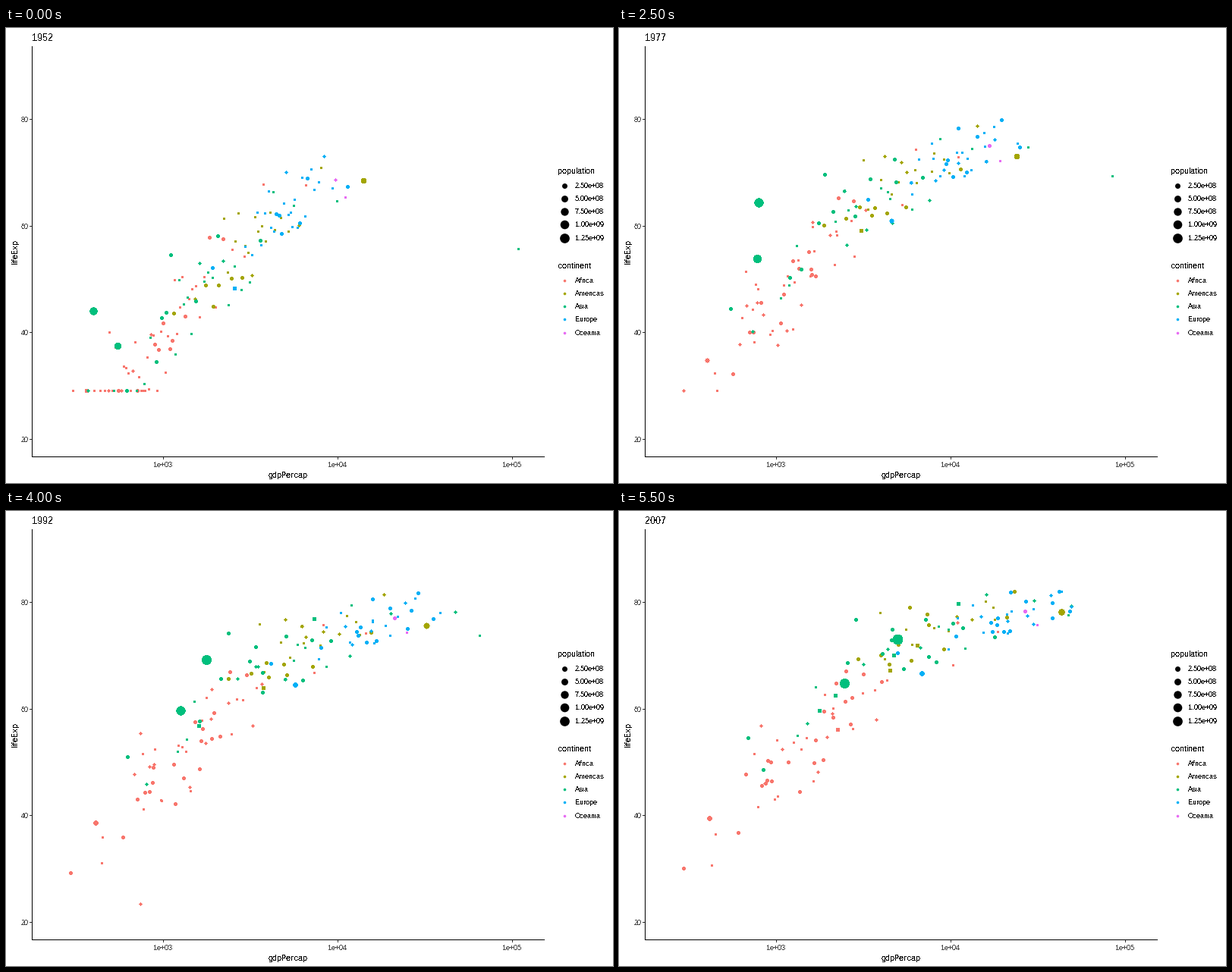
Animation, 800 px wide and 600 px high, one loop 6 s. Source, as a matplotlib script:

```python
import numpy as np
import matplotlib.pyplot as plt
from matplotlib.animation import FuncAnimation

plt.rcParams.update({
    "font.family": "Liberation Sans",
    "text.hinting": "native",
    "text.hinting_factor": 1,
    "text.antialiased": False,
})

PX = 0.72  # points per pixel at 100 dpi
YEARS = range(1952, 2008, 5)
COLORS = {"Africa": "#F8766D", "Americas": "#A3A500", "Asia": "#00BF7D",
          "Europe": "#00B0F6", "Oceania": "#E76BF3"}

# Count, first and last mean of log GDP, spread, late lift in life expectancy
CONTINENTS = {
    "Africa": (51, 2.99, 3.22, 0.29, -3),
    "Americas": (24, 3.48, 3.90, 0.22, 4),
    "Asia": (30, 3.20, 3.75, 0.35, 3),
    "Europe": (30, 3.70, 4.33, 0.19, 1),
    "Oceania": (2, 4.01, 4.46, 0.05, 1),
}

# Each track is (first, last, pace)
LANDMARKS = [
    dict(continent="Africa", pop=(2.5, 9), gdp=(493, 863, 1), life=(40, 46, 1), dip=(1992, 21)),
    dict(continent="Americas", pop=(158, 301), gdp=(13990, 42952, 0.93), life=(68.4, 78.2, 0.95)),
    dict(continent="Asia", pop=(0.2, 2.5), gdp=(108382, 47307, 1.5), life=(55.6, 77.6, 0.6)),
    dict(continent="Asia", pop=(372, 1110), gdp=(547, 2452, 1.85), life=(37.4, 64.7, 0.65)),
    dict(continent="Asia", pop=(556, 1319), gdp=(400, 4959, 1.65), life=(44, 73, 0.45), dip=(1962, 13)),
]


def progress(year):
    return (year - 1952) / 55


def track(t, first, last, pace=1):
    return first + (last - first) * t ** pace


def make_continent(rng, count, start):
    """Evenly ranked wealth scores, skewed to the right for poor continents."""
    u = (np.arange(count) + 0.5) / count
    wealth = np.log(u / (1 - u)) / 2
    wealth += 0.25 * (3.5 - start) * (wealth ** 2 - 1)
    health = np.clip(rng.normal(size=count), -2, 2)
    drift = rng.uniform(-0.5, 0.5, count)
    pop = np.clip(5 * np.exp(1.1 * rng.normal(size=count)), 0.3, 70)
    return wealth, health, drift, pop


def continent_state(year, spec, traits):
    _, start, end, spread, lift = spec
    wealth, health, drift, pop = traits
    t = progress(year)
    log_gdp = track(t, start, end, 0.8) + spread * (1 + 0.3 * t) * (wealth + t * drift)
    log_gdp = np.clip(log_gdp, 2.47, 4.69)
    # Life expectancy saturates with wealth, and the gap closes over time
    gap = 30 + 13 * (1 - t) ** 2
    life = 84 - gap * np.exp(3 - log_gdp) + lift * t
    life += 6 * health * np.exp(0.7 * (3 - log_gdp))
    return log_gdp, np.clip(life, 29, 82), pop * (1 + 1.1 * t)


def landmark_state(year, country):
    t = progress(year)
    first, last, pace = country["gdp"]
    log_gdp = track(t, np.log10(first), np.log10(last), pace)
    dip_year, depth = country.get("dip", (year, 0))
    life = track(t, *country["life"]) - depth * max(0, 1 - abs(year - dip_year) / 6)
    return [log_gdp], [life], [track(t, *country["pop"])]


def to_x(log_gdp):
    return np.floor(207.5 + 230 * (log_gdp - 3)) + 0.5


def to_y(life):
    return np.floor(120.5 + 7.025 * (80 - life)) + 0.5


def area(pop):
    diameter = 2.3 + 10.7 * np.sqrt(np.asarray(pop) / 1319)
    return (diameter * PX) ** 2


rng = np.random.default_rng(7)
traits = {name: make_continent(rng, *spec[:2]) for name, spec in CONTINENTS.items()}
dot_colors = [COLORS[name] for name, spec in CONTINENTS.items() for _ in range(spec[0])]
dot_colors += [COLORS[country["continent"]] for country in LANDMARKS]


def world(year):
    parts = [continent_state(year, CONTINENTS[name], traits[name]) for name in CONTINENTS]
    parts += [landmark_state(year, country) for country in LANDMARKS]
    return np.hstack([np.array(part) for part in parts])


fig = plt.figure(figsize=(8, 6), dpi=100, facecolor="white")
ax = fig.add_axes([0, 0, 1, 1])
ax.set(xlim=(0, 800), ylim=(600, 0))
ax.axis("off")


def line(xs, ys, color="black"):
    ax.plot(xs, ys, color=color, lw=PX, antialiased=False, snap=False,
            solid_capstyle="butt")


def label(x, y, text, size, color="black", **kwargs):
    return ax.text(x, y, text, fontsize=size * PX, color=color, va="baseline", **kwargs)


def dots(x, y, sizes, colors):
    return ax.scatter(x, y, s=sizes, c=colors, linewidths=0, antialiased=False)


# Axes
line([34.5, 34.5], [24, 566])
line([34, 710], [565.5, 565.5])
for value in range(20, 81, 20):
    y = to_y(value)
    line([31, 34], [y, y], "#333333")
    label(29.5, y + 3.5, str(value), 9, "#4D4D4D", ha="right")
for power in (3, 4, 5):
    x = to_x(power)
    line([x, x], [566, 569], "#333333")
    label(x - 1, 579, f"1e+0{power}", 9, "#4D4D4D", ha="center")
label(372, 593, "gdpPercap", 11, ha="center")
label(15, 295, "lifeExp", 11, ha="center", rotation=90, rotation_mode="anchor")
title = label(34, 17, "", 13)

# Legends
label(727, 192, "population", 11)
for row in range(5):
    pop = 250 * (row + 1)
    y = np.floor(207 + 17.25 * row) + 0.5
    dots([735.5], [y], area([pop]), "black")
    label(750, y + 3.5, f"{pop * 1e6:.2e}", 9)
label(727, 317, "continent", 11)
for row, (name, color) in enumerate(COLORS.items()):
    y = np.floor(332 + 17.25 * row) + 0.5
    dots([735.5], [y], [(3.6 * PX) ** 2], color)
    label(750, y + 3.5, name, 9)

blank = np.zeros(len(dot_colors))
cloud = dots(blank, blank, blank + 1, dot_colors)


def update(frame):
    year = YEARS[frame]
    log_gdp, life, pop = world(year)
    cloud.set_offsets(np.column_stack([to_x(log_gdp), to_y(life)]))
    cloud.set_sizes(area(pop))
    title.set_text(str(year))
    return cloud, title


anim = FuncAnimation(fig, update, frames=len(YEARS), interval=500,
                     repeat=True, repeat_delay=0, blit=False)
plt.show()
```
